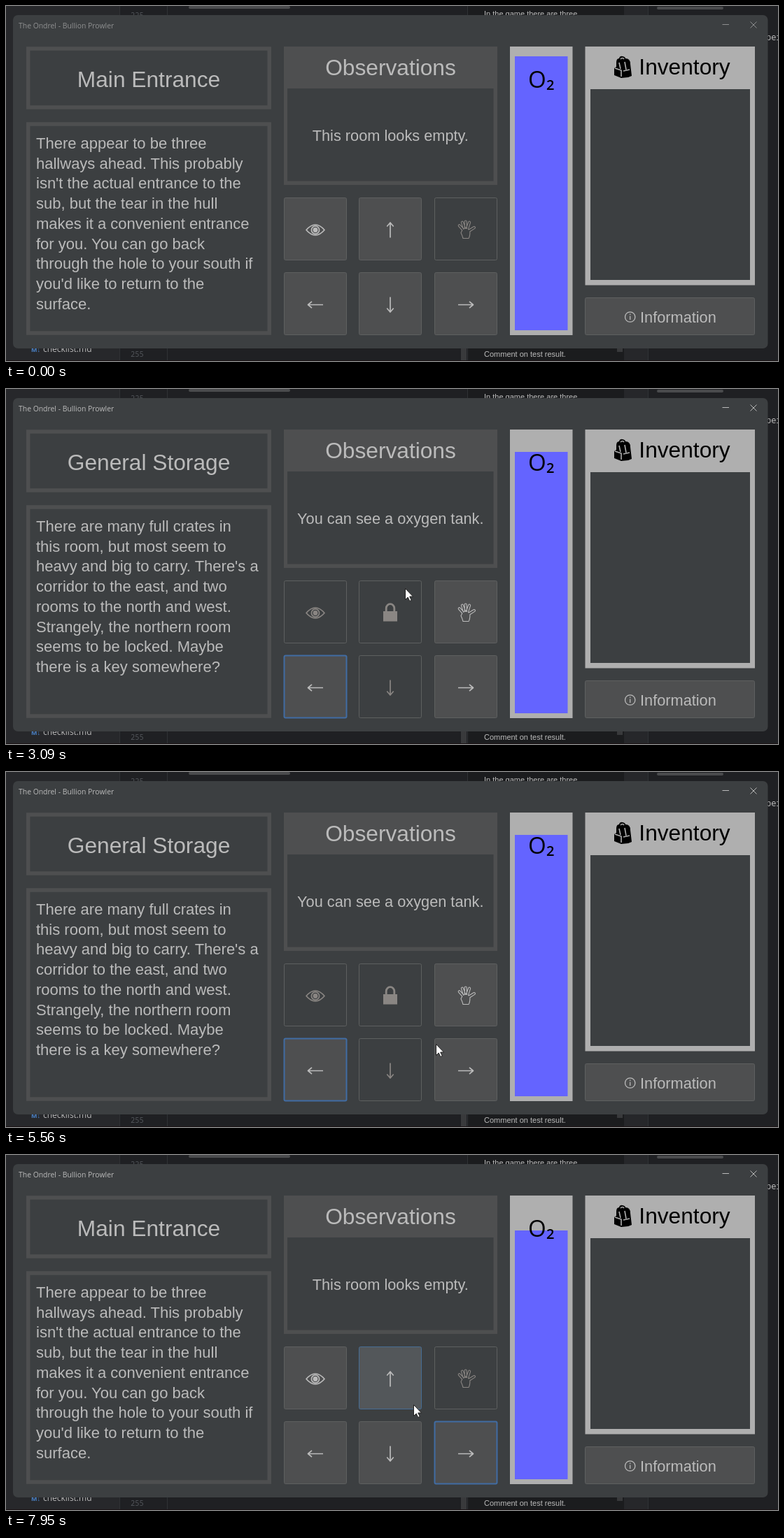
These frames come from a looping animation (1103 px wide and 508 px high, 8000 ms). An HTML page:

```html
<!DOCTYPE html>
<html lang="en">
<head>
<meta charset="utf-8">
<title>Submarine adventure</title>
<style>
  html, body { margin: 0; width: 100%; height: 100%; overflow: hidden; background: #1f2023; }
  svg { display: block; width: 100%; height: 100%; }
  text { font-family: "Liberation Sans", Arial, sans-serif; fill: #bbb; white-space: pre; }
  .head { font-size: 31.7px; text-anchor: middle; }
  .body { font-size: 21.75px; }
  #story { font-size: 22px; }
  .mid { text-anchor: middle; }
  .small { font-size: 11px; }
  .ui { font-family: "Open Sans", "Noto Sans", sans-serif; }
  .mono { font-family: "Noto Sans Mono", monospace; font-size: 12px; }
  .num { font-size: 10.5px; fill: #515459; }
  .ink { fill: #000; }
  .panel { fill: #3c3f41; stroke: #4e4f50; stroke-width: 5.5; }
  .icon { color: #bbb; fill: none; stroke: currentColor; stroke-width: 1.7; stroke-linejoin: round; }
  .button rect { fill: #4e4f50; stroke: #5e6060; }
  .off rect { fill: #3c3f41; }
  .off .icon { color: #8a8683; }
  .hover rect { fill: #53575a; stroke: #466d94; }
  .pressed rect { fill: #5a5e61; }
  .focus rect { stroke: #416ca3; stroke-width: 2; }
</style>
</head>
<body>
<svg viewBox="0 0 1103 508" preserveAspectRatio="none">
  <defs>
    <g id="eye">
      <path d="M-13 0Q0-15 13 0Q0 15-13 0Z"/>
      <circle r="5.6"/>
      <circle r="3.4" fill="currentColor" stroke="none"/>
    </g>
    <path id="arrow" d="M0 11V-10M-4.7-5L0-10.5L4.7-5"/>
    <path id="hand" stroke-width="1.1"/>
    <g id="lock">
      <path d="M-10-2.500H10V12H-10Z" fill="currentColor" stroke="none"/>
      <path d="M-5.8-2V-7a5.8 5.8 0 0 1 11.6 0V-2" stroke-width="2.8"/>
    </g>
  </defs>

  <!-- desktop behind the game window -->
  <rect width="162" height="508" fill="#27282b"/>
  <rect x="659" width="224" height="508" fill="#1b1c1e"/>
  <rect x="883" width="34" height="508" fill="#26272a"/>
  <path d="M162.5 0V508M230.5 0V508M659.5 0V508M917.5 0V508" stroke="#303235"/>
  <rect x="261" width="145" height="4" rx="2" fill="#4a4b4d"/>
  <rect x="930" y="1" width="95" height="4" rx="2" fill="#4a4b4d"/>
  <path d="M650 488H658V508H650ZM873 488H881V495H873Z" fill="#393a3c"/>
  <text class="mono num" x="178" y="17">225</text>
  <text class="mono num" x="178" y="502">255</text>
  <text class="small" x="683" y="15">In the game there are three</text>
  <text class="small" x="683" y="502">Comment on test result.</text>
  <text class="ui" x="36" y="495" style="fill:#4b83c9;font-size:9px;font-weight:700">M↓</text>
  <text class="ui" x="53" y="495" style="font-size:12px">checklist.md</text>
  <text class="mono" x="1086" y="49">per</text>
  <rect y="507" width="1103" height="1" fill="#1c1416"/>

  <rect x="10" y="13" width="1078.5" height="477" rx="7" fill="#3c3f41"/>
  <g id="caption">
    <text class="ui" x="18" y="32" style="font-size:10.4px">The Ondrel - Bullion Prowler</text>
    <path d="M1023.5 26.5H1033M1063.500 22.5L1072.5 31.5M1072.5 22.5L1063.5 31.5" stroke="#bbb"/>
  </g>

  <rect class="panel" x="31.7" y="61" width="344.5" height="84"/>
  <text class="head" id="name" x="204" y="116"></text>
  <rect class="panel" x="31.7" y="169" width="344.5" height="299"/>
  <g id="story"></g>

  <rect x="397" y="58" width="305" height="198" fill="#4e4f50"/>
  <rect x="402" y="118" width="294.5" height="132.500" fill="#3c3f41"/>
  <text class="head" x="549.5" y="99">Observations</text>
  <text class="body mid" id="seen" x="549.3" y="193"></text>

  <rect x="720" y="58" width="89.5" height="413" fill="#afafaf"/>
  <rect id="oxygen" x="727" width="75.5" fill="#6464ff"/>
  <text class="ui ink" x="746" y="117" style="font-size:33px">O</text>
  <text class="ui ink" x="772" y="120" style="font-size:20px;font-weight:600">2</text>

  <rect x="827.5" y="58" width="242.5" height="341.500" fill="#afafaf"/>
  <rect x="835" y="119" width="228" height="273" fill="#3c3f41"/>
  <text class="head ink" x="969.5" y="98">Inventory</text>
  <g transform="translate(868 71)">
    <path d="M4 10Q4 4 8 4Q9 0 13 1T17 4Q24 4 24 12L26 29L21 31L11 32L1 28V18L4 16Z"/>
    <path d="M10 5Q13 2 15 5M8 10L10 19M16 9L18 20M2 18L11 21V30M14 22L23 20" fill="none" stroke="#afafaf" stroke-width="1.6"/>
  </g>

  <g id="buttons"></g>
  <path id="cursor" d="M.5.5V16.5L4.2 13L6.800 18.5L9.3 17.3L6.700 12H11.5Z" fill="#fff" stroke="#222"/>
</svg>
<script>
const LOOP = 8000;
const CAPTURE_STEP = 68;
const byId = id => document.getElementById(id);

const rooms = {
  main: {
    name: "Main Entrance", seen: "This room looks empty.", off: ["hand"],
    story: ["There appear to be three", "hallways ahead. This probably", "isn't the actual entrance to the",
      "sub, but the tear in the hull", "makes it a convenient entrance", "for you. You can go back",
      "through the hole to your south if", "you'd like to return to the", "surface."]
  },
  west: {
    name: "West Corridor", seen: "You can see a screw.", off: ["eye", "down"], bolt: true,
    story: ["This corridor continues to the", "west and east. There is a door to", "the north that has a", "it."]
  },
  storage: {
    name: "General Storage", seen: "You can see a oxygen tank.", off: ["eye", "up", "down"], locked: true,
    story: ["There are many full crates in", "this room, but most seem to", "heavy and big to carry. There's a",
      "corridor to the east, and two", "rooms to the north and west.", "Strangely, the northern room",
      "seems to be locked. Maybe", "there is a key somewhere?"]
  }
};

const events = [
  { at: 0, room: "main" },
  { at: 1510, focus: "left", pressed: "left" },
  { at: 1570, room: "west", pressed: "" },
  { at: 2250, room: "storage" },
  { at: 6400, focus: "right", pressed: "right" },
  { at: 6530, room: "west", pressed: "" },
  { at: 7410, pressed: "right" },
  { at: 7550, room: "main", pressed: "" }
];

// Each move leads from the previous resting place to `to`, arching by `bend` halfway.
const moves = [
  { start: 200, end: 600, from: [1027, 474], to: [700, 366] },
  { start: 820, end: 1360, to: [447, 413], bend: [0, -38] },
  { start: 2110, end: 2110, to: [431, 403] },
  { start: 2780, end: 3530, to: [560, 325], bend: [99, -97] },
  { start: 3590, end: 4360, to: [472, 238], bend: [80, 107] },
  { start: 4430, end: 4830, to: [598, 298], bend: [28, 113] },
  { start: 5090, end: 5830, to: [644, 417], bend: [-14, 16] },
  { start: 7070, end: 7270, to: [672, 415], bend: [0, -7] },
  { start: 7740, end: 7950, to: [582, 357] }
];
moves.forEach((move, i) => move.from ??= moves[i - 1].to);

function pointerAt(t) {
  const move = moves.findLast(m => m.start <= t);
  if (!move) return null;
  const { start, end, from, to, bend = [0, 0] } = move;
  if (t >= end) return to;
  const steps = Math.round((end - start) / CAPTURE_STEP);
  const k = Math.floor((t - start) / (end - start) * steps + 0.25) / steps;
  return from.map((a, i) => Math.round(a + (to[i] - a) * k + bend[i] * 4 * k * (1 - k)));
}

function handPath() {
  const fingers = [-42, -19, -1, 19, 58].map((angle, i) => {
    const a = angle * Math.PI / 180, reach = i % 4 ? 16 : 14;
    const point = (r, side) =>
      `${(r * Math.sin(a) + side * Math.cos(a)).toFixed(1)} ${(4 - r * Math.cos(a) + side * Math.sin(a)).toFixed(1)}`;
    return `L${point(6, -1.6)}L${point(reach, -1.5)}A1.5 1.5 0 0 1 ${point(reach, 1.5)}L${point(6, 1.6)}`;
  });
  return `M-4 12Q-5 8-7 4${fingers.join("")}Q6 9 4 12Z`;
}
byId("hand").setAttribute("d", handPath());

const turns = { left: -90, down: 180, right: 90 };
const buttons = ["eye", "up", "hand", "left", "down", "right"].map((id, i) => ({
  id, w: 89, h: 89,
  x: Math.floor(397 + 107.5 * (i % 3)) + 0.5,
  y: Math.floor(274 + 107.5 * Math.floor(i / 3)) + 0.5
}));
buttons.push({ id: "info", x: 827.5, y: 417.5, w: 242, h: 53 });

const iconMarkup = ({ id, x, y }) => id === "info"
  ? `<g class="icon" style="stroke-width:1.3"><circle cx="891.7" cy="445" r="7.2"/><path d="M891.7 443.5V449M891.7 440.5V442"/></g>
     <text class="body" x="906" y="452.5">Information</text>`
  : `<use class="icon" href="#${byId(id) ? id : "arrow"}" transform="translate(${x + 44.5} ${y + 46}) rotate(${turns[id] || 0})"/>`;
byId("buttons").innerHTML = buttons.map(b =>
  `<g id="b-${b.id}"><rect x="${b.x}" y="${b.y}" width="${b.w}" height="${b.h}" rx="2"/>${iconMarkup(b)}</g>`).join("");

const boltMarkup = `<path class="icon" style="stroke-width:1.1" d="M243 247.5L239 255H243.5L240 262L248.5 252.5H244.5L248 247.5Z"/>
  <text x="254.5" y="261.4">symbol on</text>`;

let shownRoom;
function showRoom(id) {
  if (id === shownRoom) return;
  shownRoom = id;
  const room = rooms[id];
  byId("name").textContent = room.name;
  byId("seen").textContent = room.seen;
  byId("story").innerHTML = room.story.map((line, i) =>
    `<text x="43" y="${204 + 28.7 * i}">${line}</text>`).join("") + (room.bolt ? boltMarkup : "");
  byId("b-up").querySelector("use").setAttribute("href", room.locked ? "#lock" : "#arrow");
}

function render(t) {
  const past = events.filter(e => e.at <= t);
  const { room, focus, pressed } = Object.assign({}, ...past);
  showRoom(room);

  // Every room change uses up a slice of oxygen.
  const top = 63 + 9 * past.filter(e => e.room).length;
  byId("oxygen").setAttribute("y", top);
  byId("oxygen").setAttribute("height", 464 - top);
  byId("caption").setAttribute("opacity", focus ? 1 : 0.65);

  const pointer = pointerAt(t);
  const [x, y] = pointer || [0, 0];
  byId("cursor").setAttribute("visibility", pointer ? "visible" : "hidden");
  byId("cursor").setAttribute("transform", `translate(${x} ${y})`);

  for (const b of buttons) {
    const off = rooms[room].off.includes(b.id);
    const inside = x > b.x + 3 && x < b.x + b.w - 3 && y > b.y + 3 && y < b.y + b.h - 3;
    const state = { off, hover: inside && !off, pressed: pressed === b.id, focus: focus === b.id };
    const names = Object.keys(state).filter(key => state[key]);
    byId("b-" + b.id).setAttribute("class", ["button", ...names].join(" "));
  }
}

const began = performance.now();
function tick() {
  render((performance.now() - began) % LOOP);
  requestAnimationFrame(tick);
}
tick();
</script>
</body>
</html>
```
